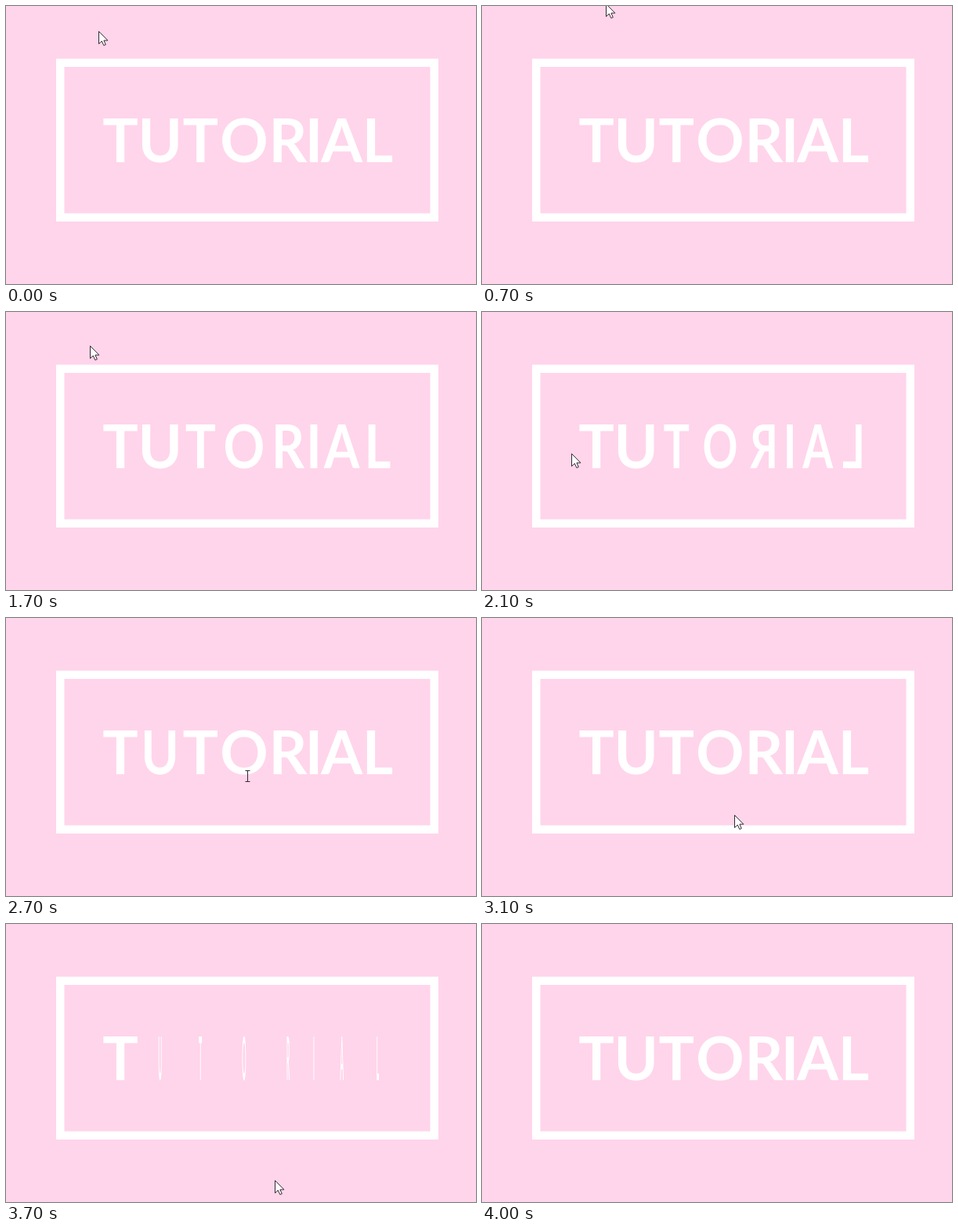
Write an HTML page with a canvas that moves like this. It is 600 px wide and 356 px high and loops after 5000 ms.

```html
<!DOCTYPE html>
<html lang="en">
<head>
<meta charset="utf-8">
<title>Tutorial</title>
<style>
html, body { margin: 0; height: 100%; overflow: hidden; background: #ffd5eb; }
canvas { display: block; }
</style>
</head>
<body>
<canvas id="stage" width="600" height="356"></canvas>
<script>
const ctx = document.getElementById('stage').getContext('2d');
const LOOP = 5000, STEP = 100;
const word = 'TUTORIAL', centres = [146, 196.6, 248.3, 304, 360, 393, 428.7, 474.4];
const arrow = new Path2D('M0 0V16L3.8 12.5 6.3 18 8.8 17 6.4 11.6H11.4Z');
const beam = new Path2D('M-3-7H3M0-7V7M-3 7H3');

// Pointer stops: time, x, y
const stops = [
  [0, 118, 32], [200, 122, 63], [700, 158, -3], [1100, 158, -3], [1700, 107, 43],
  [2100, 114, 181], [2300, 308, 202], [2900, 308, 202], [3400, 343, 328], [4000, 343, 328]
];

const mix = (a, b, p) => a + (b - a) * p;

// Share of one eased full turn done at time t
function turn(t, start, time) {
  const p = Math.min(1, Math.max(0, (t - start) / time));
  return p * p * (3 - 2 * p);
}

// The first two letters trail behind the rest; the very first turns only once
function turnsOf(i, t) {
  const first = i < 2 ? turn(t, 2640 - 580 * i, 900 - 120 * i) : turn(t, 1520, 1000);
  return first + (i ? turn(t, 3050, 950) : 0);
}

function drawWord(t) {
  ctx.font = '700 76px Lato, "Open Sans", sans-serif';
  ctx.textAlign = 'center';
  centres.forEach((x, i) => {
    ctx.save();
    ctx.translate(x, 199.5);
    ctx.scale(Math.cos(turnsOf(i, t) * 2 * Math.PI), 1);
    ctx.fillText(word[i], 0, 0);
    ctx.restore();
  });
}

function drawPointer(t) {
  const next = stops.findIndex(s => s[0] > t);
  const [t0, x0, y0] = stops[next - 1], [t1, x1, y1] = stops[next];
  const p = (t - t0) / (t1 - t0);
  ctx.save();
  ctx.translate(Math.round(mix(x0, x1, p)) + .5, Math.round(mix(y0, y1, p)) + .5);
  ctx.strokeStyle = '#332a30';
  ctx.lineWidth = 1;
  const overText = t > 2100 && t < 3000;
  if (!overText) ctx.fill(arrow);
  ctx.stroke(overText ? beam : arrow);
  ctx.restore();
}

function draw(now) {
  const t = Math.floor(now % LOOP / STEP) * STEP;
  ctx.clearRect(0, 0, 600, 356);
  ctx.fillStyle = ctx.strokeStyle = '#fff';
  ctx.lineWidth = 10.5;
  ctx.strokeRect(69.25, 72.75, 477.5, 198);
  drawWord(t);
  if (t < 4000) drawPointer(t);
}

const began = performance.now();
function tick() {
  draw(performance.now() - began);
  requestAnimationFrame(tick);
}
tick();
</script>
</body>
</html>
```
